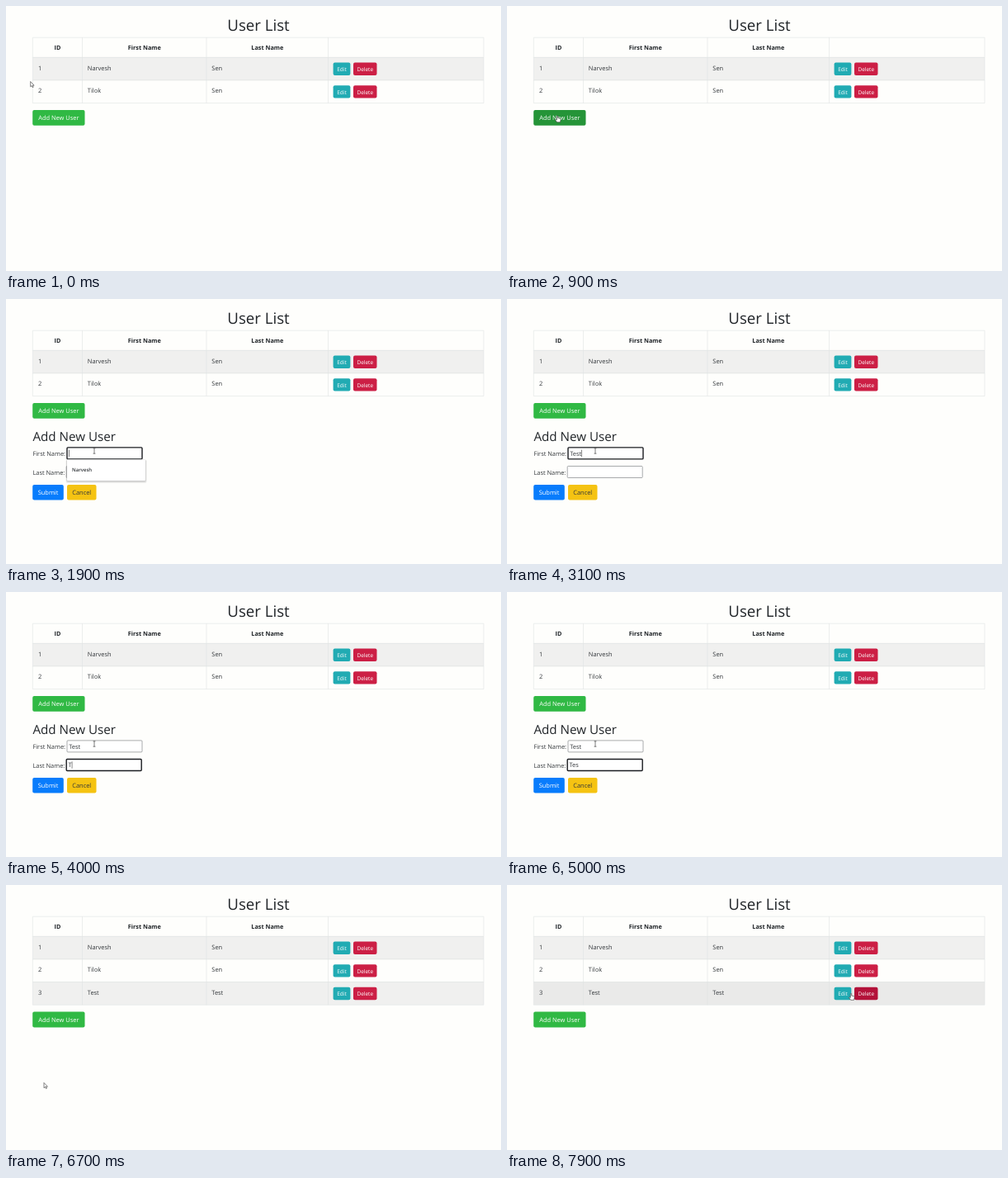
These frames come from a looping animation (600 by 321 pixels, 8000 ms). An HTML page:

```html
<!DOCTYPE html>
<html lang="en">
<head>
<meta charset="utf-8">
<title>User List</title>
<style>
  html, body { margin: 0; width: 100%; height: 100%; overflow: hidden; background: #fefefc; }
  svg { display: block; width: 100vw; height: 100vh; }
  text { font: 7.45px "Open Sans", "Noto Sans", sans-serif; fill: #33373b; text-rendering: geometricPrecision; white-space: pre; }
  .title { font-size: 18.7px; font-weight: 500; fill: #212529; }
  .subtitle { font-size: 15.2px; font-weight: 500; fill: #212529; }
  .head { font-size: 7.3px; font-weight: 700; fill: #212529; }
  .small { font-size: 6.5px; }
  .hint { font-size: 6px; font-weight: 600; }
  .mid { text-anchor: middle; }
  .light { fill: #fff; }
</style>
</head>
<body>
<svg id="stage" viewBox="0 0 600 321"></svg>
<script>
const LOOP = 8000, ROW = 27.6, TOP = 62.4;
const FORM_OPEN = 1200, FIRST_FOCUS = 1700, LAST_FOCUS = 3600, SUBMITTED = 6600;
const FIRST_KEYS = [2200, 2400, 2600, 2800];
const LAST_KEYS = [4000, 4200, 4400, 5300];
const WORD = 'Test';

// Pointer stops: time, x, y
const PATH = [
  [100, 29.7, 91.5], [600, 48, 150], [850, 61, 133], [1250, 61, 133],
  [1650, 107, 184], [5500, 107, 184], [5900, 46, 239.5], [6700, 46, 239.5],
  [7200, 300, 152], [7600, 440, 133], [7900, 417, 131.5]
];

const stage = document.getElementById('stage');

function add(parent, tag, attrs = {}, content = '') {
  const node = document.createElementNS('http://www.w3.org/2000/svg', tag);
  for (const key in attrs) node.setAttribute(key, attrs[key]);
  node.textContent = content;
  return parent.appendChild(node);
}
const group = parent => add(parent, 'g');
const label = (parent, x, y, content, cls = '') => add(parent, 'text', { x, y, class: cls }, content);
const box = (parent, x, y, width, height, fill, rx = 0) =>
  add(parent, 'rect', { x, y, width, height, fill, rx });
const line = (parent, d) => add(parent, 'path', { d, fill: 'none', stroke: '#e0e2e3', 'stroke-width': .6 });
const show = (node, on) => node.setAttribute('display', on ? 'inline' : 'none');

const buttons = [];
function button(parent, x, y, w, h, content, fill, hover, cls = 'light') {
  const rect = box(parent, x, y, w, h, fill, 2);
  label(parent, x + w / 2, y + h / 2 + 2.7, content, 'mid ' + cls);
  const item = { x, y, w, h, rect, fill, hover };
  buttons.push(item);
  return item;
}

function tableRow(index, id, first, last) {
  const g = group(stage), y = TOP + index * ROW;
  const bg = box(g, 32.3, y, 546.7, ROW, index % 2 ? '#fefefc' : '#f0f0ef');
  line(g, `M32.3 ${y}H579V${y + ROW}H32.3ZM92.5 ${y}v${ROW}M243 ${y}v${ROW}M390.5 ${y}v${ROW}`);
  [[39, id], [98.8, first], [249.3, last]].forEach(([x, s]) => label(g, x, y + 15.3, s));
  const actions = [
    button(g, 396.6, y + 6.2, 20.8, 15.4, 'Edit', '#21abb3', '#168a9a', 'light small'),
    button(g, 421, y + 6.2, 28.5, 15.4, 'Delete', '#cc1f45', '#b3123a', 'light small')
  ];
  return { g, bg, actions };
}

function field(parent, x, y, keys) {
  const frame = box(parent, x, y, 91, 14, '#fff', 1);
  const text = label(parent, x + 2.2, y + 9.7, '');
  const caret = box(parent, x + 2.4, y + 2.8, .6, 8.4, '#333');
  return { x, y, w: 91, h: 14, frame, text, caret, keys };
}

// Page
label(stage, 306, 29.7, 'User List', 'mid title');
line(stage, `M32.3 38.2H579V${TOP}H32.3ZM92.5 38.2V${TOP}M243 38.2V${TOP}M390.5 38.2V${TOP}`);
[[62.5, 'ID'], [167.8, 'First Name'], [316.8, 'Last Name']].forEach(([x, s]) => label(stage, x, 53, s, 'mid head'));
tableRow(0, '1', 'Narvesh', 'Sen');
tableRow(1, '2', 'Tilok', 'Sen');
const newRow = tableRow(2, '3', WORD, WORD);

const addGroup = group(stage);
const addButton = button(addGroup, 32.2, 126, 63.3, 18.8, 'Add New User', '#30b944', '#259438');

const form = group(stage);
label(form, 32.4, 172.2, 'Add New User', 'subtitle');
label(form, 32.4, 190, 'First Name:');
label(form, 32.4, 212.5, 'Last Name:');
const firstField = field(form, 74, 179.9, FIRST_KEYS);
const lastField = field(form, 73.2, 202.5, LAST_KEYS);
const fields = [firstField, lastField];
const formButtons = [
  button(form, 32.2, 225, 37.6, 18.4, 'Submit', '#087cfc', '#0868d2'),
  button(form, 74, 225, 35.5, 18.4, 'Cancel', '#f5c312', '#dfac0c', '')
];

const popup = group(form);
[3, 2, 1].forEach(s => box(popup, 74 - s / 2, 194.6, 95 + s, 25.4 + s, 'rgba(0,0,0,.07)', 2));
box(popup, 74, 194.4, 95, 25.6, '#fff', 1);
label(popup, 80, 208.7, 'Narvesh', 'hint');

// Pointers, each with its hot spot at 0,0
const pointer = group(stage);
const shape = (d, fill, stroke, width) =>
  add(pointer, 'path', { d, fill, stroke, 'stroke-width': width, 'stroke-linejoin': 'round' });
const arrow = shape('M0 0V6.3L1.5 5L2.5 7.2L3.5 6.7L2.5 4.7H4.4Z', '#fff', '#333', .6);
const hand = shape('M-.7 .2Q0-.6 .7 .2V2.6L3.6 3.3Q4.4 3.6 4.2 4.6L3.5 7.8H-.4L-2.6 4.8Q-2.4 3.8-.7 5Z', '#fff', '#333', .6);
const beam = shape('M-1.4-3.2H1.4M0-3.2V3.2M-1.4 3.2H1.4', 'none', '#444', .7);

function pointerAt(t) {
  if (t <= PATH[0][0]) return { x: PATH[0][1], y: PATH[0][2] };
  const i = PATH.findIndex(stop => stop[0] > t);
  const [t1, x1, y1] = i < 0 ? PATH[PATH.length - 1] : PATH[i];
  if (i < 0) return { x: x1, y: y1 };
  const [t0, x0, y0] = PATH[i - 1];
  const p = (t - t0) / (t1 - t0), k = p * p * (3 - 2 * p);
  return { x: x0 + (x1 - x0) * k, y: y0 + (y1 - y0) * k };
}
const inside = (p, r) => p.x >= r.x && p.x <= r.x + r.w && p.y >= r.y && p.y <= r.y + r.h;

function drawField(f, t, focusStart, focusEnd) {
  const typed = f.keys.filter(k => k <= t);
  const focused = t >= focusStart && t < focusEnd;
  const since = t - (typed.length ? typed[typed.length - 1] : focusStart);
  f.text.textContent = WORD.slice(0, typed.length);
  f.frame.setAttribute('stroke', focused ? '#1a1c20' : '#85878a');
  f.frame.setAttribute('stroke-width', focused ? 1.4 : .7);
  f.caret.setAttribute('x', f.x + 2.4 + (typed.length ? f.text.getComputedTextLength() : 0));
  show(f.caret, focused && since % 1060 < 530);
}

function draw(t) {
  const formOpen = t >= FORM_OPEN && t < SUBMITTED, saved = t >= SUBMITTED;
  const here = pointerAt(t), before = pointerAt(Math.max(0, t - 100));

  show(form, formOpen);
  show(popup, t >= FIRST_FOCUS && t < FIRST_KEYS[0]);
  show(newRow.g, saved);
  addGroup.setAttribute('transform', `translate(0 ${saved ? ROW : 0})`);
  addButton.y = 126 + (saved ? ROW : 0);
  drawField(firstField, t, FIRST_FOCUS, LAST_FOCUS);
  drawField(lastField, t, LAST_FOCUS, 6450);

  const live = b => (formOpen || !formButtons.includes(b)) && (saved || !newRow.actions.includes(b));
  // Hover colours trail the pointer slightly
  buttons.forEach(b => b.rect.setAttribute('fill', live(b) && inside(before, b) ? b.hover : b.fill));
  const rowArea = { x: 32.3, y: TOP + 2 * ROW, w: 546.7, h: ROW };
  newRow.bg.setAttribute('fill', inside(here, rowArea) ? '#eaeae9' : '#f0f0ef');

  const overButton = buttons.some(b => live(b) && inside(here, b));
  const overField = formOpen && fields.some(f => inside(here, f));
  show(hand, overButton);
  show(beam, overField);
  show(arrow, !overButton && !overField);
  pointer.setAttribute('transform', `translate(${here.x} ${here.y})`);
}

const start = performance.now();
function tick() {
  draw((performance.now() - start) % LOOP);
  requestAnimationFrame(tick);
}
tick();
</script>
</body>
</html>
```
